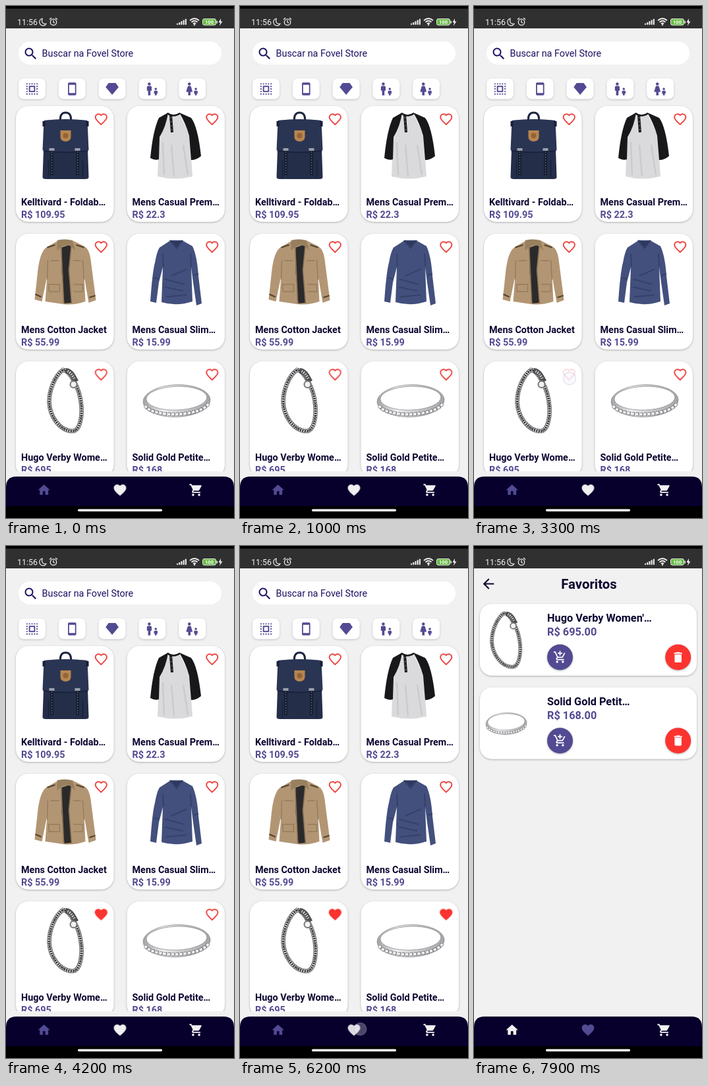
An HTML page that plays this animation: 346 px wide and 778 px high, repeating every 8000 ms.

```html
<!DOCTYPE html>
<html lang="pt-BR">
<head>
<meta charset="utf-8">
<title>Loja</title>
<style>
  html, body { margin: 0; width: 100%; height: 100%; overflow: hidden; background: #f1f1f1; }
  svg { display: block; width: 100vw; height: 100vh; font-family: Roboto, sans-serif; }
  .card { fill: #fff; filter: drop-shadow(0 1.5px 1.5px rgba(0,0,0,.27)); }
  .chip { fill: #fff; filter: drop-shadow(0 1px 1.5px rgba(0,0,0,.2)); }
  .round { filter: drop-shadow(0 1.5px 1.5px rgba(0,0,0,.3)); }
  .name { font-weight: 700; fill: #0a0530; }
  .price { font-weight: 700; fill: #524a92; }
  .touch { fill: rgba(238,235,248,.3); stroke: rgba(170,155,220,.3); stroke-width: 1.3; }
</style>
</head>
<body>
<svg id="stage" viewBox="0 0 346 778" preserveAspectRatio="none"></svg>
<script>
const LOOP = 8000;
const PURPLE = '#524a92', NAVY = '#07002c', RED = '#fc3430', LIGHT = '#f0f0f2';

const PATHS = {
  heart: 'M16.5 3c-1.74 0-3.41.81-4.5 2.09C10.91 3.81 9.24 3 7.5 3 4.42 3 2 5.42 2 8.5c0 3.78 3.4 6.86 8.55 11.54L12 21.35l1.45-1.32C18.6 15.36 22 12.28 22 8.5 22 5.42 19.58 3 16.5 3z',
  home: 'M10 20v-6h4v6h5v-8h3L12 3 2 12h3v8z',
  cart: 'M7 18a2 2 0 1 0 0 4a2 2 0 0 0 0-4zM1 2v2h2l3.6 7.59-1.35 2.45C4.5 15.4 5.5 17 7 17h12v-2H7.42l-.22-.37.9-1.63h7.45c.75 0 1.41-.41 1.75-1.03l3.58-6.49A1 1 0 0 0 20 4H5.21l-.94-2zm16 16a2 2 0 1 0 0 4a2 2 0 0 0 0-4z',
  addCart: 'M11 9h2V6h3V4h-3V1h-2v3H8v2h3zM7 18a2 2 0 1 0 0 4a2 2 0 0 0 0-4zm10 0a2 2 0 1 0 0 4a2 2 0 0 0 0-4zM7.2 14.63L8.1 13h7.45c.75 0 1.41-.41 1.75-1.03l3.86-7.01L19.42 4l-3.87 7H8.53L4.27 2H1v2h2l3.6 7.59-1.35 2.45C4.5 15.4 5.5 17 7 17h12v-2H7.42z',
  trash: 'M6 19c0 1.1.9 2 2 2h8c1.1 0 2-.9 2-2V7H6zM19 4h-3.5l-1-1h-5l-1 1H5v2h14z',
  search: 'M15.5 14h-.79l-.28-.27A6.5 6.5 0 1 0 13.73 14.43l.27.28v.79l5 4.99L20.49 19zm-6 0a4.5 4.5 0 1 1 0-9a4.5 4.5 0 0 1 0 9z',
  back: 'M20 11H7.83l5.59-5.59L12 4l-8 8 8 8 1.41-1.41L7.83 13H20z',
  phone: 'M17 1H7a2 2 0 0 0-2 2v18a2 2 0 0 0 2 2h10a2 2 0 0 0 2-2V3a2 2 0 0 0-2-2zm0 18H7V5h10z',
  gem: 'M6 2h12l5 7-11 13L1 9z',
  man: 'M5 7h4a2 2 0 0 1 2 2v6H9v8H5v-8H3V9a2 2 0 0 1 2-2zM16 15h4a1 1 0 0 1 1 1v4h-1.500v3h-3v-3H15v-4a1 1 0 0 1 1-1z',
  woman: 'M6 7h2q1.500 0 2 1.500L12.500 17H9v6H5v-6H1.500L4 8.500Q4.500 7 6 7zM16 15h4a1 1 0 0 1 1 1v4h-1.500v3h-3v-3H15v-4a1 1 0 0 1 1-1z'
};

const place = (cx, cy, size) => `translate(${cx - size / 2} ${cy - size / 2}) scale(${size / 24})`;
const icon = (name, cx, cy, size, fill, attrs = '') =>
  `<path d="${PATHS[name]}" transform="${place(cx, cy, size)}" fill="${fill}" ${attrs}/>`;
const text = (x, y, size, content, cls = '', attrs = '') =>
  `<text x="${x}" y="${y}" font-size="${size}" class="${cls}" ${attrs}>${content}</text>`;
const shape = (d, fill, attrs = '') => `<path d="${d}" fill="${fill}" ${attrs}/>`;
const line = (d, stroke, width, attrs = '') =>
  `<path d="${d}" fill="none" stroke="${stroke}" stroke-width="${width}" ${attrs}/>`;

// Product art, drawn around the picture's centre
const strap = x => line(`M${x} 6v40`, '#131a2e', 4.500) + line(`M${x} 10v36`, '#566079', 1.5, 'stroke-dasharray="2 2"') +
  `<rect x="${x - 4}" y="5" width="8" height="4" fill="#9a9fab"/>`;
const backpack = line('M-8 -36q-1-13 8-13t8 13', '#1d263f', 3.2) +
  shape('M-32 -37q32-3 64 0l3 86q0 3-5 3h-60q-5 0-5-3z', '#242e49') +
  shape('M-33 -37q33-4 66 0l2 45q-35 5-70 0z', '#2a3553') +
  line('M-34 9q34 5 68 0M-26 24v26M26 24v26', '#18213a', 1.5) +
  shape('M-35 -36h4v8h-4zM31 -36h4v8h-4z', '#18213a') +
  '<path d="M-8 -22H8V-12Q8 -6 0 -5Q-8 -6 -8 -12z" fill="#b7854f"/><circle cy="-14" r="4" fill="#936436"/>' +
  strap(-21) + strap(18);

const shirt = shape('M-14 -48Q-5 -42 4 -48L20 -14L22 20L24 48Q-3 55 -29 48L-28 20L-27 -14z', '#dadadc') +
  line('M-21 -4l2 50M10 0l7 46M-8 0l4 48', '#cbcbce', 2.500) +
  shape('M-13 -49L-27 -41Q-36 -22 -40 20Q-33 24 -27 22L-26 -12Q-16 -28 -13 -49z', '#18181b') +
  shape('M4 -49L22 -41Q32 -28 37 17Q30 23 22 23L19 -14Q14 -32 4 -49z', '#18181b') +
  line('M-14 -48Q-5 -41 5 -48', '#18181b', 2.500) +
  line('M-9 -45l2 26', '#1c1c20', 4) + line('M-9 -42l2 22', '#aaa', 1.2, 'stroke-dasharray="1.2 5"');

const jacket = shape('M-14 -47L10 -49L28 -40Q36 -36 38 -20L46 42L35 46L28 5L30 44Q12 50 -4 48L-31 44L-28 5L-36 44L-47 41L-42 -5Q-38 -34 -28 -39z', '#b29674') +
  shape('M-6 -38L9 -43L5 -2L9 46L-2 47L-6 0z', '#2b2a2b') +
  line('M-7 -40L-5 0L-3 46M9 -44L5 -4L9 47', '#8d7457', 1.6) +
  shape('M-13 -49Q-2 -52 10 -49L15 -33L8 -40Q0 -44 -8 -38L-13 -33z', '#98805f') +
  line('M-28 11l1-30M28 11l-2-30M-23 -18h13M11 -18h12M-26 18h17v11h-16zM12 18h14v11h-14', '#957b5c', 1.4) +
  line('M-28 -38l12-4M16 -42l12 4M-46 33l9 4M36 38l9-3', '#54432f', 2);

const sweater = shape('M-9 -49L8 -49L24 -40Q31 -25 33 5L38 47L30 50L25 15L22 -8L24 44Q0 52 -23 45L-21 -8L-27 15L-31 46L-40 44Q-37 0 -33 -15Q-30 -32 -26 -38z', '#43507d') +
  shape('M-9 -49L0 -39L8 -49Q0 -46 -9 -49z', '#2e385c') +
  line('M-10 -49L0 -37L9 -49', '#323e67', 2) +
  line('M-20 -9l-1-20M22 -9l-1-20M-18 10l30 8M-18 22l28 6M-16 37l31-3M15 -5L-8 5M-34 8l7 2M26 4l7-2', '#364169', 2);

const loop = 'M-4 -46C-16 -38 -25 -16 -25 3C-24 24 -10 46 10 47C21 47 25 28 24 10C23 -6 18 -20 12 -30C8 -38 3 -45 -4 -46z';
const bracelet = line(loop, '#6b6b6e', 6.500) +
  line(loop, '#ececed', 4.800, 'stroke-dasharray="1.3 1.9"') +
  line(loop, '#262628', 2.4, 'stroke-dasharray="1.7 2.1"') +
  line('M0 -45Q7 -44 11 -37L16 -28', '#505053', 8) + line('M3 -44Q8 -42 13 -33', '#e0e0e0', 4, 'stroke-dasharray="1.5 2"') +
  '<circle cx="12" cy="-24" r="5" fill="#f2f2f2" stroke="#77777b" stroke-width="2"/>';

const ring = '<g transform="rotate(-2)">' +
  shape('M-51 1A51 24.500 0 1 1 51 1A51 24.500 0 1 1 -51 1zM-46 -3A46 18 0 1 0 46 -3A46 18 0 1 0 -46 -3z', 'url(#silver)', 'stroke="#8d8d91" stroke-width=".8" fill-rule="evenodd"') +
  line('M-48 7A49 18 0 0 0 48 7', '#7c7c80', 5.500, 'stroke-dasharray="5 1.2"') +
  line('M-48 7A49 18 0 0 0 48 7', '#f5f5f6', 3.700, 'stroke-dasharray="3.7 2.5"') + '</g>';

const art = (drawing, x, y, sx = 1, sy = sx) => `<g transform="translate(${x} ${y}) scale(${sx} ${sy})">${drawing}</g>`;

const products = [
  [backpack, 'Kelltivard - Foldab…', '109.95'], [shirt, 'Mens Casual Prem…', '22.3'],
  [jacket, 'Mens Cotton Jacket', '55.99'], [sweater, 'Mens Casual Slim…', '15.99'],
  [bracelet, 'Hugo Verby Wome…', '695'], [ring, 'Solid Gold Petite…', '168']
];

const productCard = ([drawing, name, price], i) => {
  const x = 15 + i % 2 * 168.5, y = 152 + Math.floor(i / 2) * 194;
  const hx = x + 129.3, hy = y + 20;
  const outline = `<g id="outline${i}" transform="${place(hx, hy, 23)}"><path d="${PATHS.heart}" transform="translate(1.2 1.2) scale(.9)" fill="none" stroke="#ee403d" stroke-width="2.2"/></g>`;
  return `<rect class="card" x="${x}" y="${y}" width="148.5" height="176" rx="19"/>` +
    art(drawing, x + 75.5, y + 59) + outline +
    (i > 3 ? icon('heart', hx, hy, 23, RED, `id="liked${i}" opacity="0"`) : '') +
    text(x + 8, y + 151, 14.4, name, 'name') + text(x + 8, y + 170, 14.4, 'R$ ' + price, 'price');
};

const chips = ['all', 'phone', 'gem', 'man', 'woman'].map((name, i) => {
  const x = 39.5 + i * 60.8;
  const people = name === 'man' || name === 'woman';
  const mark = name === 'all'
    ? `<g transform="${place(x, 126, 23)}" fill="none" stroke="${PURPLE}" stroke-width="2"><rect x="4" y="4" width="16" height="16" stroke-dasharray="2" stroke-dashoffset="1"/><rect x="8" y="8" width="8" height="8"/></g>`
    : icon(name, x, 126, 21.5, PURPLE);
  const heads = people ? `<g transform="${place(x, 126, 21.5)}" fill="${PURPLE}"><circle cx="7" cy="3.500" r="2.500"/><circle cx="18" cy="12" r="2"/></g>` : '';
  return `<rect class="chip" x="${x - 20.5}" y="110" width="41" height="31.5" rx="8"/>` + mark + heads;
}).join('');

const statusBar = '<rect width="346" height="34" fill="#303030"/><rect width="346" height="4"/>' +
  text(17, 28.5, 12.4, '11:56', '', 'fill="#f2f2f2"') +
  line('M55 19a5.5 5.5 0 1 0 6 8q-8 1-6-8z', '#eee', 1.2) +
  `<g fill="none" stroke="#eee" stroke-width="1.3"><circle cx="72" cy="24.500" r="4.700"/><path d="M72 21.500v3.200l2 1.300M66 20.500l3-2.500M78 20.500l-3-2.500"/></g>` +
  [0, 1, 2, 3, 4].map(i => `<rect x="${259 + i * 3.2}" y="${26.5 - i * 1.7}" width="2.1" height="${2 + i * 1.7}" fill="#eee"/>`).join('') +
  line('M279 22q7-6 14 0M281.500 24.500q4.500-4 9 0M284 27q2-2 4 0', '#eee', 1.7) +
  '<circle cx="286" cy="28.500" r="1.200" fill="#eee"/>' +
  '<rect x="298.500" y="19.500" width="20" height="9.500" rx="2.500" fill="#68bd45" stroke="#eee"/><rect x="319.500" y="22.500" width="1.500" height="4" fill="#eee"/>' +
  text(308.5, 27, 7.5, '100', '', 'fill="#fff" text-anchor="middle" font-weight="700"') +
  shape('M326 19l-3.500 6h2.500l-1 5 4.500-6.500H326z', '#eee');

const navIcons = active => icon('home', 57.7, 735.5, 22, active ? LIGHT : PURPLE) +
  icon('heart', 173, 735.5, 22.5, active ? PURPLE : LIGHT, `id="tab${active}"`) +
  icon('cart', 288.5, 735.5, 22, LIGHT);

const favorite = ([drawing, sx, sy, name, price], i) => {
  const y = 88 + i * 126.7;
  const button = (x, fill, mark, size) => `<circle class="round" cx="${x}" cy="${y + 81}" r="19.500" fill="${fill}"/>` + icon(mark, x, y + 81, size, '#fff');
  return `<rect class="card" x="9" y="${y}" width="329" height="109" rx="18"/>` +
    art(drawing, 49, y + 54.5, sx, sy) +
    text(111, y + 27, 16.3, name, 'name') + text(111, y + 48, 16.3, 'R$ ' + price, 'price') +
    button(130.5, PURPLE, 'addCart', 21) + button(309.7, RED, 'trash', 21);
};

const touch = (id, x, y) => `<circle id="${id}" class="touch" cx="${x}" cy="${y}" r="9.500" opacity="0"/>`;

document.getElementById('stage').innerHTML = `
  <defs>
    <linearGradient id="silver"><stop stop-color="#a2a2a6"/><stop offset=".3" stop-color="#f0f0f1"/><stop offset=".65" stop-color="#c6c6c9"/><stop offset="1" stop-color="#a4a4a8"/></linearGradient>
    <clipPath id="list"><rect y="148" width="346" height="559"/></clipPath>
  </defs>
  <rect width="346" height="778" fill="#f1f1f1"/>
  <g id="shop">
    <rect x="19" y="54" width="308" height="35" rx="17.500" fill="#fff"/>
    ${icon('search', 37.5, 72.5, 24, '#1b1262')}
    ${text(54.5, 77, 14.4, 'Buscar na Fovel Store', '', 'fill="#1b1262"')}
    ${chips}
    <g clip-path="url(#list)">${products.map(productCard).join('')}</g>
  </g>
  <g id="favorites" opacity="0">
    ${icon('back', 22, 57.5, 25, '#0a0530')}
    ${text(174.5, 65, 20.3, 'Favoritos', 'name', 'text-anchor="middle"')}
    ${[[bracelet, .88, .88, "Hugo Verby Women'…", '695.00'], [ring, .61, .68, 'Solid Gold Petit…', '168.00']].map(favorite).join('')}
  </g>
  ${statusBar}
  <rect y="755" width="346" height="23"/>
  <path d="M0 760V731Q0 715 16 715H330Q346 715 346 731V760z" fill="${NAVY}"/>
  <rect x="109" y="764.500" width="128" height="3.500" rx="1.750" fill="#fff"/>
  <g id="shopNav">${navIcons(0)}</g>
  <g id="favoritesNav" opacity="0">${navIcons(1)}</g>
  ${touch('touchA', 145, 566)}${touch('touchB', 321, 560)}${touch('touchNav', 182.5, 734)}`;

// Each table lists [time in ms, opacity], held until the next entry
const steps = (id, table) => {
  const frames = [...table, [LOOP, table.at(-1)[1]]]
    .map(([time, opacity]) => ({ offset: time / LOOP, opacity, easing: 'step-end' }));
  document.getElementById(id).animate(frames, { duration: LOOP, iterations: Infinity });
};

const timeline = {
  touchA: [[0, 0], [3200, .8], [3300, 1], [3400, .6], [3500, 0]],
  outline4: [[0, 1], [3200, .6], [3300, .2], [3500, 0]],
  liked4: [[0, 0], [3500, .85], [3800, 1]],
  touchB: [[0, 0], [4500, 1], [4700, 0]],
  outline5: [[0, 1], [4500, .2], [4700, 0]],
  liked5: [[0, 0], [4700, 1]],
  touchNav: [[0, 0], [6100, .7], [6200, 1], [6300, .7], [6400, 0]],
  tab0: [[0, 1], [6200, .92]],
  shop: [[0, 1], [6300, 0]],
  shopNav: [[0, 1], [6300, 0]],
  favorites: [[0, 0], [6300, 1]],
  favoritesNav: [[0, 0], [6300, 1]]
};
Object.entries(timeline).forEach(([id, table]) => steps(id, table));
</script>
</body>
</html>
```
